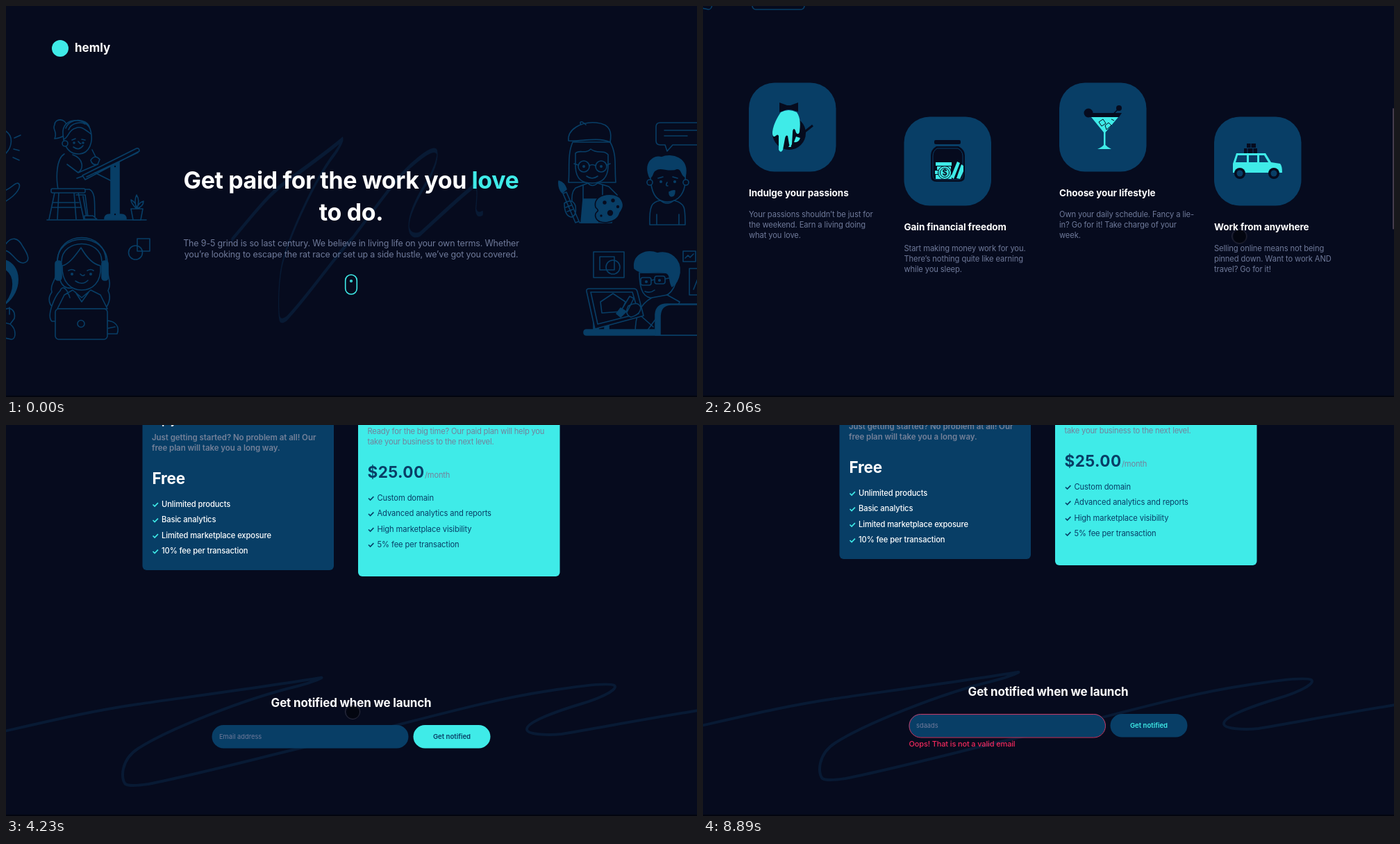
An HTML page that plays this animation: 995 px wide and 563 px high, repeating every 9.29 s.

```html
<!DOCTYPE html>
<html lang="en">
<head>
<meta charset="utf-8">
<title>Landing page</title>
<style>
@property --scroll { syntax: "<number>"; inherits: true; initial-value: 0; }
:root { --bg: #060b1e; --blue: #083e66; --cyan: #3febe8; --grey: #6f7a9a; --loop: 9290ms; }
html, body { margin: 0; width: 100%; height: 100%; overflow: hidden; background: var(--bg); }
body { position: relative; animation: scroll var(--loop) infinite; }
.page { position: absolute; left: 0; top: 0; display: block; transform: translateY(calc(var(--scroll) * -1px)); }
.thumb { position: absolute; right: 0; top: 0; width: 2px; height: 174px; background: #443b4c;
  transform: translateY(calc(var(--scroll) * .3102px)); opacity: 0; animation: thumb var(--loop) infinite; }
.edge { position: absolute; left: 0; right: 0; bottom: 0; height: 2px; background: #02050f; }
.cursor { position: absolute; left: -11px; top: -11px; width: 22px; height: 22px; box-sizing: border-box;
  border: 1.5px solid rgba(160, 150, 160, .3); border-radius: 50%; animation: cursor var(--loop) infinite; }
.cursor::after { content: ""; position: absolute; inset: .5px; border-radius: 50%; background: rgba(0, 0, 0, .45); }

text { font-family: Inter, "Open Sans", sans-serif; fill: var(--grey); font-size: 11.2px; letter-spacing: -.11px; }
.mid { text-anchor: middle; }
.bold { font-weight: 700; fill: #fff; }
.logo { font-size: 17px; letter-spacing: 0; }
.h1 { font-size: 34px; letter-spacing: -.4px; }
.lead { font-size: 12.5px; letter-spacing: -.16px; }
.h2 { font-size: 28px; letter-spacing: -.35px; }
.h3 { font-size: 17px; letter-spacing: -.18px; }
.h4 { font-size: 13.5px; letter-spacing: -.08px; }
.plan { font-size: 14.5px; letter-spacing: -.05px; }
.price { font-size: 22.5px; letter-spacing: -.2px; }
.amount { font-size: 22.5px; letter-spacing: .4px; }
.strong { font-weight: 600; font-size: 11.5px; letter-spacing: -.05px; fill: #748199; }
.item { font-weight: 500; fill: #fff; }
.dark, .dark text { fill: var(--blue); }
.dim { fill: #74809b; }
.dim, .note { letter-spacing: -.2px; }
.field { font-size: 9.3px; letter-spacing: 0; }
.action { font-size: 9.6px; letter-spacing: 0; font-weight: 600; }

.art { fill: var(--bg); stroke: var(--blue); stroke-width: 1.6; stroke-linecap: round; stroke-linejoin: round; }
.art .n { fill: none; }
.art .f { fill: var(--blue); }
.art .cut { stroke: var(--bg); }
.swash { fill: none; stroke: #081a34; stroke-width: 4; stroke-linecap: round; stroke-linejoin: round; }
.swash path, .swash use { vector-effect: non-scaling-stroke; }
.b { fill: var(--blue); }
.c { fill: var(--cyan); }
.d { fill: var(--bg); }
.line { fill: none; stroke-width: 1.6; }
.thin { stroke-width: 1; }
.sc { stroke: var(--cyan); }
.sb { stroke: var(--blue); }
.sd { stroke: var(--bg); }

.hint { animation: hint var(--loop) step-end infinite; }
.typed tspan { fill-opacity: 0; animation: key var(--loop) step-end calc(var(--i) * 70ms) infinite; }
.focus { fill: none; stroke: #efb54c; stroke-width: 1.8; animation: focus var(--loop) step-end infinite; }
.button { animation: press var(--loop) infinite; }
.action { animation: label var(--loop) infinite; }
.error { fill: none; stroke: #c93a66; animation: error var(--loop) infinite; }
.oops { fill: #f0295c; stroke: none; font-size: 11px; font-weight: 500; letter-spacing: -.14px; }
.shift { animation: shift var(--loop) step-end infinite; }

@keyframes scroll {
  0% { --scroll: 0; }
  11.84% { --scroll: 0; animation-timing-function: steps(7); }
  17.65% { --scroll: 300; animation-timing-function: steps(2); }
  19.27% { --scroll: 400; }
  20.78% { --scroll: 400; animation-timing-function: steps(4); }
  23.68%, 25.73% { --scroll: 700; }
  25.78% { --scroll: 713; animation-timing-function: steps(2); }
  27.45% { --scroll: 1000; }
  29.49% { --scroll: 1000; animation-timing-function: steps(3); }
  31.7% { --scroll: 1161.5; animation-timing-function: steps(2); }
  33.26% { --scroll: 1238; }
  86.1% { --scroll: 1238; animation-timing-function: steps(2); }
  87.7%, 100% { --scroll: 1254; }
}
@keyframes thumb {
  0%, 12.5% { opacity: 0; }
  12.6%, 36.1% { opacity: 1; }
  38.9%, 86% { opacity: 0; }
  86.2%, 89.7% { opacity: 1; }
  95.69%, 100% { opacity: 0; }
}
@keyframes cursor {
  0% { transform: translate(952px, 597px); animation-timing-function: steps(10); }
  7.64%, 21.42% { transform: translate(773.5px, 331.5px); }
  23.68% { transform: translate(771.5px, 331.5px); }
  38.21% { transform: translate(771.5px, 331.5px); animation-timing-function: steps(13); }
  48.44% { transform: translate(378px, 449px); }
  55.22% { transform: translate(378px, 449px); animation-timing-function: steps(6); }
  59.42%, 60.82% { transform: translate(697px, 466px); }
  61.52% { transform: translate(685px, 457px); }
  65.23% { transform: translate(685px, 457px); animation-timing-function: steps(6); }
  69.75% { transform: translate(774px, 464px); }
  71.91% { transform: translate(774px, 464px); animation-timing-function: steps(7); }
  77.07% { transform: translate(805px, 478px); }
  78.47% { transform: translate(805px, 478px); animation-timing-function: steps(8); }
  84.28% { transform: translate(835.5px, 487px); animation-timing-function: steps(6); }
  88.91% { transform: translate(887px, 414px); animation-timing-function: steps(7); }
  94.19%, 100% { transform: translate(955px, 582px); }
}
@keyframes hint { 0% { opacity: 1; } 51.4%, 100% { opacity: 0; } }
@keyframes key { 0% { fill-opacity: 0; } 51.4%, 100% { fill-opacity: 1; } }
@keyframes focus { 0% { opacity: 0; } 49.84% { opacity: 1; } 63.8%, 100% { opacity: 0; } }
@keyframes press { 0%, 63.8% { fill: #3febe8; } 66%, 100% { fill: #083e66; } }
@keyframes label { 0%, 63.8% { fill: #083e66; } 66%, 100% { fill: #3febe8; } }
@keyframes error { 0%, 72% { opacity: 0; } 77%, 100% { opacity: 1; } }
@keyframes shift { 0% { transform: none; } 72.66%, 100% { transform: translateY(8px); } }
</style>
</head>
<body>
<svg class="page" width="995" height="1840" viewBox="0 0 995 1840">
  <defs>
    <path id="swash" d="M-42 450 C60 427 120 412 190 402 S400 373 452 364 C462 362 440 371 420 376 C340 395 230 440 190 466 C165 482 165 510 172 517 Q178 521 205 517 C300 498 420 464 500 448 C620 418 700 395 780 383 C830 375 868 371 876 375 C882 380 860 392 830 401 C790 413 750 428 750 438 C750 446 780 447 800 445 C870 433 950 418 1040 404 C1065 402 1050 420 1050 424 Q1055 430 1080 427"/>
    <path id="tick" class="line" d="M0 0 l2.6 2.6 l4.8 -5"/>
    <rect id="tile" class="b" width="125.5" height="128" rx="37"/>
  </defs>

  <!-- hero -->
  <g class="swash"><use href="#swash" transform="translate(338.5 -421) scale(.322 1.684)"/></g>

  <g class="art">
    <!-- left edge -->
    <path class="n" d="M-2 179 C12 187 9 204 -2 214 M12 190 l9 -4 M11 206 l8 2 M10 218 l9 4 M-2 266 C8 262 12 255 17 255 C24 258 16 272 -2 282"/>
    <path d="M-2 345 C8 330 18 334 24 346 C32 358 36 368 25 370 C15 371 8 352 -2 352"/>
    <path class="f" d="M-2 366 C22 372 25 410 -2 430 C14 410 14 388 -2 378 Z"/>
    <path d="M-2 437 C8 432 14 440 12 450 L6 458 C16 466 14 480 8 480 L-2 478 M5 434 v10 M-2 456 l8 2"/>

    <!-- drafting table -->
    <path d="M59 308 H202"/>
    <path d="M88 174 C86 160 70 162 70 171 C66 178 75 181 70 191 C82 190 90 184 88 174 Z"/>
    <path d="M82 184 C80 158 118 160 122 180 C126 196 120 212 106 213 C92 214 83 204 82 184 Z"/>
    <path class="n" d="M83 192 C90 190 90 178 100 176 C108 172 114 178 122 184 M86 176 C92 160 116 162 120 174 M90 178 C94 168 108 166 114 170 M95 193 l5 -2 M109 192 l5 1 M97 203 q8 6 14 -2 M104 195 q3 4 4 3"/>
    <circle class="f" cx="98" cy="197" r="1"/><circle class="f" cx="111" cy="197" r="1"/><circle cx="85" cy="198" r="4"/>
    <path d="M84 213 C72 220 72 248 75 264 H120 C130 268 127 288 128 304 H116 L111 274 M101 272 H114 L118 304 M96 214 C112 220 112 234 104 240 L88 228 M104 240 L132 228 M102 248 L130 238"/>
    <path d="M70 269 L62 307 M76 269 L74 307 M104 269 L112 307 M98 269 L101 307 M66 290 H107 M68 283 H105"/>
    <rect x="65" y="263" width="49" height="6" rx="2"/>
    <path d="M113 307 v-5 h12 l6 5 Z"/>
    <path d="M110 244 L188 205 Q192 204 192 209 L114 250 Z M116 246 L190 211"/>
    <path class="f" d="M151 230 L163 225 V300 H151 Z M142 307 q0 -7 7 -7 h17 q7 0 7 7 Z"/>
    <path d="M128 240 L152 252 M124 207 l8 16"/>
    <path d="M122 222 q6 -9 13 -1 l-3 7 q-8 2 -10 -6 Z"/>
    <circle cx="157" cy="231" r="2"/><circle cx="157" cy="300" r="2"/>
    <path d="M188 292 C180 284 180 280 180 279 C186 282 188 288 188 292 C184 280 187 274 188 272 C192 278 191 286 188 292 C190 286 194 282 198 281 C198 286 194 290 188 292 M180 292 H197 L194 308 H183 Z"/>

    <!-- headset -->
    <path d="M74 372 C70 324 148 324 146 372 C145 390 153 398 147 410 C152 420 148 432 140 438 H74 C60 432 60 420 66 412 C62 400 76 392 74 372 Z"/>
    <path d="M81 374 C90 372 98 362 108 348 C116 362 126 372 136 374 C138 398 124 409 109 409 C94 409 80 398 81 374 Z"/>
    <path class="n" d="M74 368 C74 322 144 322 144 368 M80 368 C80 334 138 334 138 368 M90 381 q5 -3 9 0 M117 381 q5 -3 9 0 M100 396 q10 7 18 -1 M107 386 q4 4 6 1"/>
    <circle class="f" cx="95" cy="386" r="1.2"/><circle class="f" cx="122" cy="386" r="1.2"/>
    <rect class="f" x="71" y="367" width="9" height="28" rx="4"/><rect class="f" x="138" y="367" width="9" height="28" rx="4"/>
    <path class="n" d="M78 395 q4 13 18 11"/>
    <path d="M96 409 L84 416 L74 436 H146 L136 416 L122 409 L109 420 Z M100 412 l9 14 l10 -14 M92 420 C86 402 80 404 78 410 C70 418 58 446 66 454 H76"/>
    <path d="M146 453 C158 454 164 462 160 472 H144 Z M147 464 l10 -2"/>
    <rect x="71" y="436" width="75" height="44" rx="5"/><circle class="n" cx="108" cy="457.5" r="5"/>
    <rect class="n" x="189" y="335" width="18" height="18"/><circle class="n" cx="186.5" cy="355" r="10"/>

    <!-- painter -->
    <path d="M816 196 C808 214 812 236 810 254 H878 C876 230 880 214 870 196 Z"/>
    <path d="M820 212 C826 206 834 214 842 206 C852 214 860 206 867 214 V232 C866 250 856 255 844 255 C830 255 821 250 820 232 Z"/>
    <path d="M810 194 C808 178 828 166 850 168 C872 170 872 184 870 196 C850 188 826 196 810 194 Z M828 171 q-3 -5 2 -4 l5 4"/>
    <circle class="n" cx="832" cy="231" r="8"/><circle class="n" cx="857" cy="231" r="8"/>
    <path class="n" d="M840 230 q4 -3 9 0 M836 245 q8 6 16 0 M818 227 l6 2 M865 229 l5 -2"/>
    <circle class="f" cx="832" cy="231" r="1.2"/><circle class="f" cx="857" cy="231" r="1.2"/>
    <path d="M838 255 L820 262 C810 272 816 300 826 312 H872 L880 272 L868 260 L852 255 Q844 262 838 255 Z"/>
    <path class="f" d="M831 278 H859 V290 L852 312 H828 Z"/>
    <path class="n" d="M831 278 V258 M859 278 V258"/>
    <path class="f cut" d="M849 290 C844 272 872 266 884 276 C892 286 888 292 884 298 C880 314 852 316 849 304 C846 294 858 298 849 290 Z"/>
    <circle cx="862" cy="283" r="3.5"/><circle cx="874" cy="280" r="3.5"/><circle cx="881" cy="289" r="3"/><circle cx="870" cy="298" r="5"/><circle cx="857" cy="302" r="2.5"/>
    <path d="M802 270 l5 -2 l18 42 l-5 2 Z M804 284 q12 -8 16 4 q2 14 -6 16 q-10 -2 -10 -20 Z M806 290 l8 -3 M808 296 l8 -3"/>
    <path class="f" d="M796 252 q8 2 11 12 l-6 5 q-6 -6 -5 -17 Z"/>

    <!-- chat -->
    <path d="M1000 168 H942 Q936 168 936 174 V194 Q936 200 942 200 H949 L952 209 L960 200 H1000 M948 179 H1000 M948 187 h33"/>
    <path d="M928 243 C926 220 978 220 978 243 C980 270 968 282 952 282 C936 282 928 268 928 243 Z"/>
    <path class="f" d="M927 247 C918 226 932 214 944 218 C958 212 984 218 978 246 C972 244 974 234 966 234 C956 240 942 230 936 236 C930 238 932 246 927 247 Z"/>
    <circle cx="927" cy="254" r="4"/><circle cx="979" cy="254" r="4"/>
    <path class="n" d="M939 248 l7 -2 M960 246 l7 2 M952 254 q-3 5 1 5"/>
    <circle class="f" cx="943" cy="253" r="1.3"/><circle class="f" cx="963" cy="253" r="1.3"/>
    <path class="f" d="M955 268 q6 -3 8 -2 q0 8 -5 8 q-3 -1 -3 -6 Z"/>
    <path d="M942 280 C930 282 926 288 927 315 H978 C978 290 978 284 962 280 Q952 288 942 280 Z M937 300 V315 M969 300 V315"/>

    <!-- designer -->
    <rect x="846" y="354" width="44" height="37"/><rect class="n" x="855" y="361" width="21" height="19"/><circle class="n" cx="874" cy="376" r="10"/>
    <rect x="975" y="353" width="18" height="15"/><path class="n" d="M978 363 l4 -4 l3 3 l5 -5"/>
    <rect x="984" y="378" width="30" height="38"/><path class="n" d="M990 408 l8 -20"/>
    <path d="M912 384 C912 410 918 422 936 421 C954 420 966 408 966 384 Z"/>
    <path class="f" d="M905 378 C902 358 922 350 938 356 C956 352 972 364 970 384 C968 396 962 402 959 404 C954 396 958 386 950 384 C936 378 918 390 905 378 Z"/>
    <rect class="n" x="914" y="391" width="15" height="11" rx="3"/><rect class="n" x="934" y="389" width="15" height="11" rx="3"/>
    <path class="n" d="M929 395 l5 -1 M949 393 l10 -2 M920 411 q8 3 14 -2"/>
    <circle class="f" cx="922" cy="397" r="1.3"/><circle class="f" cx="941" cy="395" r="1.3"/>
    <path d="M930 420 C912 430 906 446 906 472 H950 L970 426 L952 416 Z M914 446 L932 462 M920 472 L936 450"/>
    <path class="f" d="M846 450 h7 v18 h-7 Z M862 450 h6 v18 h-6 Z"/>
    <path d="M836 411 Q835 407 840 407 H904 Q908 407 909 411 L918 446 L848 465 Z"/>
    <path class="n" d="M842 412 H902 L911 443 L852 458 Z M858 442 L856 426 L874 414 L892 426 L886 440 Z"/>
    <path d="M886 438 L898 418 L904 421 L894 441 Z M896 432 q14 -8 18 2 q0 10 -14 14 q-10 -4 -4 -16 Z"/>
    <path class="f" d="M879 443 l6 -8 l8 5 l-8 8 Z"/>
    <path class="f" d="M836 466 H1000 V474 H836 Q832 474 832 470 Q832 466 836 466 Z"/>
    <path class="f" d="M935 474 V444 Q936 429 952 429 H1000 V474 Z"/>
    <path d="M942 474 V446 Q943 430 958 430 H1000 V474 Z"/>
  </g>

  <circle class="c" cx="78" cy="61" r="12"/>
  <text class="bold logo" x="99" y="66">hemly</text>
  <text class="bold h1 mid" x="497" y="262.5">Get paid for the work you <tspan class="c">love</tspan></text>
  <text class="bold h1 mid" x="497" y="308.5">to do.</text>
  <text class="lead mid" x="497" y="345.5">The 9-5 grind is so last century. We believe in living life on your own terms. Whether</text>
  <text class="lead mid" x="497" y="362">you’re looking to escape the rat race or set up a side hustle, we’ve got you covered.</text>
  <g class="line sc"><rect x="488.7" y="387" width="16.6" height="28" rx="8.2"/><circle cx="497" cy="396" r="1.3"/></g>

  <!-- features -->
  <use href="#tile" x="66" y="585.5"/><use href="#tile" x="289.5" y="634.5"/>
  <use href="#tile" x="513" y="585.5"/><use href="#tile" x="736" y="634.5"/>

  <g transform="translate(0 300)">
    <circle class="d" cx="124" cy="358" r="24"/>
    <path class="c" d="M112 328 Q123 322 135 328 C141 336 140 348 139 356 C138 361 134 360 133 354 C131 350 129 352 129 358 L128 374 Q126 379 124 374 L122 362 Q119 360 118 366 L115 382 Q112 388 109 382 V362 C106 358 105 364 102 363 C97 360 102 342 112 328 Z"/>
    <path class="d" d="M110 314 L121 318 H126 L137 314 V327 L126 324 H121 L110 328 Z"/>
    <path class="line sd" d="M134 366 L158 347" style="stroke-width:3"/><path class="c" d="M131 371 l3 -8 l6 2 q-2 7 -9 6 Z M123 378 l3 -5 l1 5 Z"/>

    <rect class="d" x="333" y="368" width="38" height="6" rx="2"/>
    <path class="d" d="M336 377 H368 Q377 382 377 390 V420 Q377 428 369 428 H336 Q328 428 328 420 V390 Q328 382 336 377 Z"/>
    <path class="line thin sb" d="M337 380 H367 Q374 384 374 391 V419 Q374 425 368 425 H337 Q331 425 331 419 V391 Q331 384 337 380 Z"/>
    <path class="c" d="M335 400 h23 v5 h-23 Z M337 406 h20 v5 h-20 Z M334 412 h20 v5 h-20 Z M335 418 h23 v6 h-23 Z M357 421 L366 399 l4 2 L361 424 Z M365 423 L372 403 l3 2 v8 l-5 11 Z"/>
    <circle class="c sd" cx="348" cy="415" r="9.5"/><circle class="line thin sd" cx="348" cy="415" r="6.5"/>
    <text class="bold mid d" x="348" y="419">$</text>

    <path class="d" d="M549 329 H603 L599 335 H555 Z"/><circle class="d" cx="555" cy="329" r="6.5"/><circle class="d" cx="599" cy="322" r="4"/>
    <path class="line sd" d="M578 344 L601 320"/>
    <path class="c" d="M559 335 H598 L579.5 357 V375 Q582 378 588 381 H568 Q575 378 577 375 V357 Z"/>
    <path class="line thin sd" d="M570 342 l6 -4 l4 6 l-6 4 Z M579 347 l5 -4 l4 4 l-7 6 Z M588 338 l4 2"/>

    <path class="d" d="M779 380 h19 v8 h-19 Z M783 373 h13 v6 h-13 Z"/><path class="line thin sb" d="M784 380 v8 M792 380 v8 M789 373 v6"/>
    <path class="c" d="M768 387 H810 L818 400 L831 402 Q834 405 834 415 H763 V402 Z"/>
    <path class="b" d="M770 390 H783 V400 H767 Z M786 390 H798 V400 H786 Z M801 390 H808 L814 400 H801 Z"/>
    <circle class="d" cx="773" cy="416" r="8"/><circle class="d" cx="822" cy="416" r="8"/>
    <circle class="b" cx="773" cy="416" r="4.5"/><circle class="b" cx="822" cy="416" r="4.5"/>
  </g>

  <text class="bold h4" x="66" y="748.5">Indulge your passions</text>
  <text y="778.5">
    <tspan x="66">Your passions shouldn’t be just for</tspan><tspan x="66" dy="15.3">the weekend. Earn a living doing</tspan><tspan x="66" dy="15.3">what you love.</tspan>
  </text>
  <text class="bold h4" x="289.5" y="797.5">Gain financial freedom</text>
  <text y="827.5">
    <tspan x="289.5">Start making money work for you.</tspan><tspan x="289.5" dy="15.3">There’s nothing quite like earning</tspan><tspan x="289.5" dy="15.3">while you sleep.</tspan>
  </text>
  <text class="bold h4" x="513" y="748.5">Choose your lifestyle</text>
  <text y="778.5">
    <tspan x="513">Own your daily schedule. Fancy a lie-</tspan><tspan x="513" dy="15.3">in? Go for it! Take charge of your</tspan><tspan x="513" dy="15.3">week.</tspan>
  </text>
  <text class="bold h4" x="736" y="797.5">Work from anywhere</text>
  <text y="827.5">
    <tspan x="736">Selling online means not being</tspan><tspan x="736" dy="15.3">pinned down. Want to work AND</tspan><tspan x="736" dy="15.3">travel? Go for it!</tspan>
  </text>

  <!-- pricing -->
  <text class="bold h2 mid" x="497" y="1062">Our pricing plans</text>
  <text class="note mid" x="497" y="1110">We only make money when our creators make money. Our plans are always affordable, and it’s completely free to get</text>
  <text class="note mid" x="497" y="1125.5">started.</text>

  <rect class="b" x="196.5" y="1187" width="275.5" height="260" rx="6"/>
  <g class="line sc"><rect x="223" y="1174.5" width="19" height="18.5"/><circle cx="221" cy="1194.5" r="10"/></g>
  <text class="bold plan" x="210" y="1237">Dip your toe</text>
  <text class="strong" x="210" y="1260">Just getting started? No problem at all! Our</text>
  <text class="strong" x="210" y="1275">free plan will take you a long way.</text>
  <text class="bold price" x="210.5" y="1322.5">Free</text>
  <g class="sc"><use href="#tick" x="211.5" y="1352.5"/><use href="#tick" x="211.5" y="1375"/><use href="#tick" x="211.5" y="1397.5"/><use href="#tick" x="211.5" y="1420"/></g>
  <text class="item" x="224" y="1355.5">Unlimited products</text>
  <text class="item" x="224" y="1378">Basic analytics</text>
  <text class="item" x="224" y="1400.5">Limited marketplace exposure</text>
  <text class="item" x="224" y="1423">10% fee per transaction</text>

  <rect class="c" x="507" y="1177.5" width="290.5" height="278.5" rx="6"/>
  <g class="line sb"><rect x="522" y="1150.5" width="33" height="44"/><rect x="531" y="1156" width="18" height="14.5"/><path d="M537 1165 L547 1189.5 H527 Z"/></g>
  <text class="dim" x="520.5" y="1251">Ready for the big time? Our paid plan will help you</text>
  <text class="dim" x="520.5" y="1266">take your business to the next level.</text>
  <text class="dim" x="603" y="1313.5">/month</text>
  <g class="sb"><use href="#tick" x="522" y="1343.5"/><use href="#tick" x="522" y="1366"/><use href="#tick" x="522" y="1388.5"/><use href="#tick" x="522" y="1410.5"/></g>
  <g class="dark">
    <text class="plan" font-weight="600" x="520.5" y="1228">Dive right in</text>
    <text class="amount" font-weight="700" x="520.5" y="1313.5">$25.00</text>
    <text x="534.5" y="1346.5">Custom domain</text>
    <text x="534.5" y="1369">Advanced analytics and reports</text>
    <text x="534.5" y="1391.5">High marketplace visibility</text>
    <text x="534.5" y="1413.5">5% fee per transaction</text>
  </g>

  <!-- sign-up -->
  <g class="swash" transform="translate(0 1238)"><use class="shift" href="#swash"/></g>
  <text class="bold h3 mid" x="497" y="1644">Get notified when we launch</text>
  <rect class="b" x="296.5" y="1670" width="283" height="33.5" rx="16.75"/>
  <rect class="focus" x="296" y="1669.5" width="284.5" height="34.8" rx="17.4"/>
  <text class="field hint" x="307" y="1689.5">Email address</text>
  <text class="field typed" x="307" y="1689.5"><tspan style="--i:0">s</tspan><tspan style="--i:1">d</tspan><tspan style="--i:2">a</tspan><tspan style="--i:3">a</tspan><tspan style="--i:4">d</tspan><tspan style="--i:5">s</tspan></text>
  <rect class="button" x="586.5" y="1670" width="111" height="33.5" rx="16.75"/>
  <text class="action mid" x="642" y="1690">Get notified</text>
  <g class="error">
    <rect x="297" y="1670.5" width="282.5" height="33.5" rx="16.75"/>
    <text class="oops" x="296.5" y="1716.5">Oops! That is not a valid email</text>
  </g>
</svg>
<div class="thumb"></div>
<div class="edge"></div>
<div class="cursor"></div>
</body>
</html>
```
